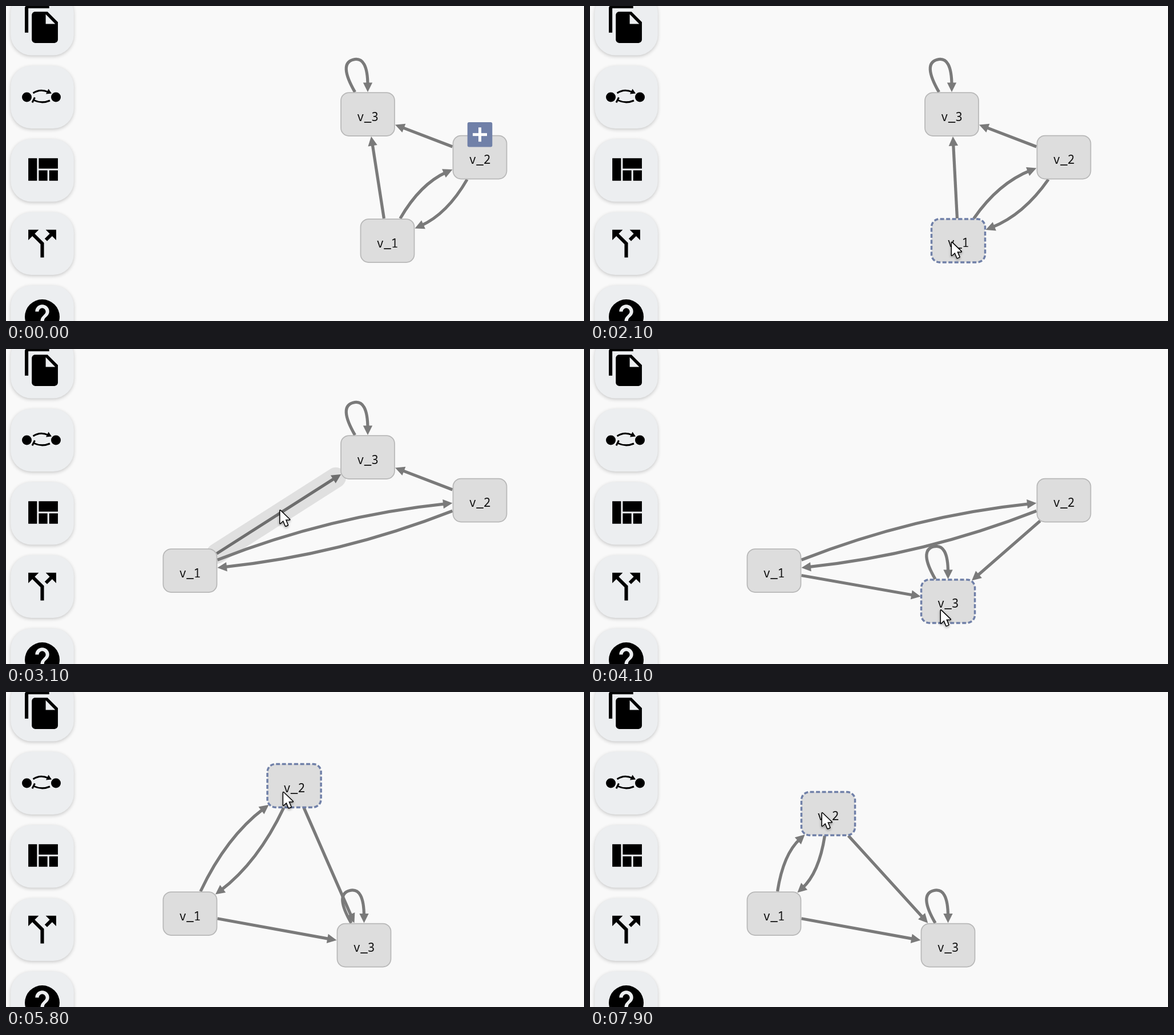
These frames come from a looping animation (1013 by 553 pixels, 8000 ms). An HTML page with a canvas:

```html
<!DOCTYPE html>
<html lang="en">
<head>
<meta charset="utf-8">
<style>
html, body { margin: 0; width: 100%; height: 100%; overflow: hidden; background: #f9f9f9; }
canvas { display: block; }
</style>
</head>
<body>
<canvas id="stage" width="1013" height="553"></canvas>
<script>
const ctx = document.getElementById('stage').getContext('2d');
const LOOP = 8000, STEP = 100;
const HALF_W = 47, HALF_H = 38, RADIUS = 14;
const BEND = 35.5, CURSOR_LEAD = 11;
const EDGE = '#7a7a7a', ACCENT = '#7080a8';

const vec = (x, y) => ({ x, y });
const add = (a, b, k = 1) => vec(a.x + b.x * k, a.y + b.y * k);
const mix = (a, b, p) => vec(a.x + (b.x - a.x) * p, a.y + (b.y - a.y) * p);
const progress = (t, from, to) => Math.min(1, Math.max(0, (t - from) / (to - from)));
const smooth = u => u * u * (3 - 2 * u);
const easeOut = u => 1 - (1 - u) ** 3.3;
const linear = u => u;

const home = { v_1: vec(668.5, 412), v_2: vec(830.5, 265.5), v_3: vec(634, 190) };
const entry = vec(690, 452);
const links = [['v_1', 'v_3', 0], ['v_2', 'v_3', 0], ['v_1', 'v_2', BEND], ['v_2', 'v_1', BEND]];

// The cursor travels from `approach` to `enter`, then carries the node from `start` to `end`
const drags = [
  { node: 'v_1', approach: 1100, enter: 1400, start: 1988, end: 2700, ease: smooth,
    to: vec(322.5, 389), bow: 2, grip: vec(-8, 1), detour: vec(0, 0) },
  { node: 'v_3', approach: 2800, enter: 3400, start: 3690, end: 4120, ease: smooth,
    to: vec(627.5, 444.5), bow: 0, grip: vec(-13.5, 12), detour: vec(12, -15) },
  { node: 'v_2', approach: 4300, enter: 4800, start: 5075, end: 6200, ease: easeOut,
    to: vec(494, 190.5), bow: -37, grip: vec(-19, 9), detour: vec(0, 0) },
  { node: 'v_2', approach: 7000, enter: 7400, start: 7700, end: 7900, ease: linear,
    to: vec(417.5, 213.5), bow: 0, grip: vec(-11.5, -3.5), detour: vec(-50, 95) }
];

function nodeAt(name, t) {
  let pos = home[name];
  for (const d of drags) {
    if (d.node !== name || t < d.start) continue;
    const u = progress(t, d.start, d.end);
    pos = add(mix(pos, d.to, d.ease(u)), vec(0, d.bow * Math.sin(Math.PI * u ** .75)));
  }
  return pos;
}

function cursorAt(t) {
  const i = drags.findLastIndex(d => t >= d.approach);
  if (i < 0) return null;
  const d = drags[i], last = drags[i - 1];
  const u = progress(t, d.approach, d.enter);
  const held = add(nodeAt(d.node, t + CURSOR_LEAD), d.grip);
  const from = last ? add(last.to, last.grip) : entry;
  return add(mix(from, held, u), d.detour, Math.sin(Math.PI * u));
}

function handleOwner(t) {
  if (t < drags[0].approach) return 'v_2';
  return drags.find(d => t >= d.enter && t < d.start)?.node;
}

// Point on a node's rounded border in the direction of p
function border(node, p) {
  const dx = p.x - node.x, dy = p.y - node.y, len = Math.hypot(dx, dy);
  const w = HALF_W + 1, h = HALF_H + 1, r = RADIUS + 1;
  const ux = Math.abs(dx / len), uy = Math.abs(dy / len);
  let k = Math.min(w / ux, h / uy);
  const cx = w - r, cy = h - r;
  if (k * ux > cx && k * uy > cy) {
    const along = cx * ux + cy * uy;
    k = along + Math.sqrt(along * along - cx * cx - cy * cy + r * r);
  }
  return vec(node.x + dx / len * k, node.y + dy / len * k);
}

function makeEdge(a, b, bend) {
  const dx = b.x - a.x, dy = b.y - a.y, len = Math.hypot(dx, dy);
  const ctrl = add(mix(a, b, .5), vec(dy / len, -dx / len), bend);
  const start = border(a, ctrl), tip = border(b, ctrl);
  const angle = Math.atan2(tip.y - ctrl.y, tip.x - ctrl.x);
  const end = add(tip, vec(Math.cos(angle), Math.sin(angle)), -11);
  const path = new Path2D();
  path.moveTo(start.x, start.y);
  path.quadraticCurveTo(ctrl.x, ctrl.y, end.x, end.y);
  return { path, tip, angle };
}

function makeLoop({ x, y }) {
  const r = 102.7, path = new Path2D();
  path.moveTo(x - 22.4, y - 38.9);
  path.quadraticCurveTo(x - r / 2, y - r * .866, x - r / 4, y - r * .933);
  path.quadraticCurveTo(x, y - r, x, y - 50);
  return { path, tip: vec(x, y - 39), angle: Math.PI / 2 };
}

function drawEdge({ path, tip, angle }) {
  ctx.strokeStyle = ctx.fillStyle = EDGE;
  ctx.lineWidth = 5.25;
  ctx.stroke(path);
  ctx.save();
  ctx.translate(tip.x, tip.y);
  ctx.rotate(angle);
  ctx.fill(new Path2D('M0 0L-16.5 -8.2V8.2Z'));
  ctx.restore();
}

function drawGlow({ path }) {
  ctx.save();
  ctx.lineCap = 'round';
  ctx.lineWidth = 36;
  ctx.strokeStyle = 'rgba(0,0,0,.1)';
  ctx.stroke(path);
  ctx.restore();
}

function drawNode(name, { x, y }, dashed) {
  ctx.save();
  ctx.translate(x, y);
  ctx.beginPath();
  ctx.moveTo(0, -HALF_H);
  ctx.arcTo(HALF_W, -HALF_H, HALF_W, 0, RADIUS);
  ctx.arcTo(HALF_W, HALF_H, 0, HALF_H, RADIUS);
  ctx.arcTo(-HALF_W, HALF_H, -HALF_W, 0, RADIUS);
  ctx.arcTo(-HALF_W, -HALF_H, 0, -HALF_H, RADIUS);
  ctx.closePath();
  ctx.fillStyle = '#ddd';
  ctx.fill();
  ctx.setLineDash(dashed ? [7, 3.5] : []);
  ctx.lineWidth = dashed ? 3.5 : 1.75;
  ctx.strokeStyle = dashed ? ACCENT : '#b8b8b8';
  ctx.stroke();
  ctx.fillStyle = '#111';
  ctx.font = '21px "Noto Sans Mono", monospace';
  ctx.textAlign = 'center';
  ctx.fillText(name, 0, 11.5);
  ctx.restore();
}

function drawHandle({ x, y }) {
  ctx.fillStyle = ACCENT;
  ctx.beginPath();
  ctx.roundRect(x - 21.8, y - 61.5, 43.6, 43.6, 3);
  ctx.fill();
  ctx.fillStyle = '#fff';
  ctx.fillRect(x - 12.5, y - 42.3, 25, 5);
  ctx.fillRect(x - 2.5, y - 52.3, 5, 25);
}

const icons = [
  'M16 1H4c-1.1 0-2 .9-2 2v14h2V3h12V1zm-1 4l6 6v10c0 1.1-.9 2-2 2H8c-1.1 0-2-.9-2-2V7c0-1.1.9-2 2-2h7zm-1 7h5.5L14 6.5V12z',
  '',
  'M10 18h5v-6h-5v6zm-6 0h5V5H4v13zm12 0h5v-6h-5v6zM10 5v6h11V5H10z',
  'M14 4l2.3 2.3-2.9 2.9 1.4 1.4 2.9-2.9L20 10V4zm-4 0H4v6l2.3-2.3 4.7 4.7V20h2v-8.4L7.7 6.3z',
  'M12 2a10 10 0 1 0 0 20a10 10 0 1 0 0-20zm1 17h-2v-2h2v2zm2.1-7.7l-.9.9C13.4 12.9 13 13.5 13 15h-2v-.5c0-1.1.4-2.1 1.2-2.8l1.2-1.3c.4-.4.6-.9.6-1.4a2 2 0 0 0-4 0H8a4 4 0 0 1 8 0c0 .9-.4 1.7-.9 2.3z'
].map(d => new Path2D(d));

function drawSidebar() {
  icons.forEach((icon, i) => {
    const y = 31.4 + 128.55 * i;
    ctx.save();
    ctx.shadowColor = 'rgba(0,0,0,.2)';
    ctx.shadowBlur = 6;
    ctx.shadowOffsetY = 2;
    ctx.fillStyle = '#eceef0';
    ctx.beginPath();
    ctx.roundRect(8.3, y - 55, 110.5, 110, 36);
    ctx.fill();
    ctx.restore();
    ctx.save();
    ctx.translate(26.9, y - 36.6);
    ctx.scale(3.05, 3.05);
    ctx.fillStyle = '#000';
    ctx.fill(icon);
    ctx.restore();
  });
  ctx.fillStyle = ctx.strokeStyle = '#000';
  ctx.lineWidth = 3;
  ctx.fill(new Path2D('M28 160a8.5 8.5 0 1 0 17 0a8.5 8.5 0 1 0-17 0M79 160a8.5 8.5 0 1 0 17 0a8.5 8.5 0 1 0-17 0M80 153.5L70 154.5L74.5 145.5Z'));
  ctx.stroke(new Path2D('M47.5 153Q60 144.5 74 151M77 166Q63 172 49 165.5M46 169.5L50.5 160.5'));
}

function drawCursor({ x, y }) {
  const shape = new Path2D('M1 2.5V25L6.5 20L10.5 29.5L14.2 28L10.2 18.5H17.5Z');
  ctx.save();
  ctx.translate(x, y);
  ctx.lineWidth = 3;
  ctx.lineJoin = 'round';
  ctx.strokeStyle = '#000';
  ctx.shadowColor = 'rgba(0,0,0,.4)';
  ctx.shadowBlur = 4;
  ctx.shadowOffsetY = 2;
  ctx.stroke(shape);
  ctx.shadowColor = 'transparent';
  ctx.fillStyle = '#fff';
  ctx.fill(shape);
  ctx.restore();
}

function draw(now) {
  const t = Math.floor(now % LOOP / STEP) * STEP;
  const names = Object.keys(home), nodes = {};
  for (const name of names) nodes[name] = nodeAt(name, t);
  const edges = links.map(([a, b, bend]) => makeEdge(nodes[a], nodes[b], bend));

  // Whatever lies under the cursor is highlighted, nodes before edges
  const cursor = cursorAt(t);
  const hoveredNode = cursor && names.find(n =>
    Math.abs(cursor.x - nodes[n].x) < HALF_W && Math.abs(cursor.y - nodes[n].y) < HALF_H);
  ctx.lineWidth = 20;
  const hoveredEdge = cursor && !hoveredNode &&
    edges.find(e => ctx.isPointInStroke(e.path, cursor.x, cursor.y));

  ctx.fillStyle = '#f9f9f9';
  ctx.fillRect(0, 0, 1013, 553);
  drawSidebar();
  for (const edge of edges) {
    drawEdge(edge);
    if (edge === hoveredEdge) drawGlow(edge);
  }
  drawEdge(makeLoop(nodes.v_3));
  for (const name of names) drawNode(name, nodes[name], name === hoveredNode);
  const owner = handleOwner(t);
  if (owner) drawHandle(nodes[owner]);
  if (cursor) drawCursor(cursor);
}

const begin = performance.now();
function tick() {
  draw(performance.now() - begin);
  requestAnimationFrame(tick);
}
tick();
</script>
</body>
</html>
```
